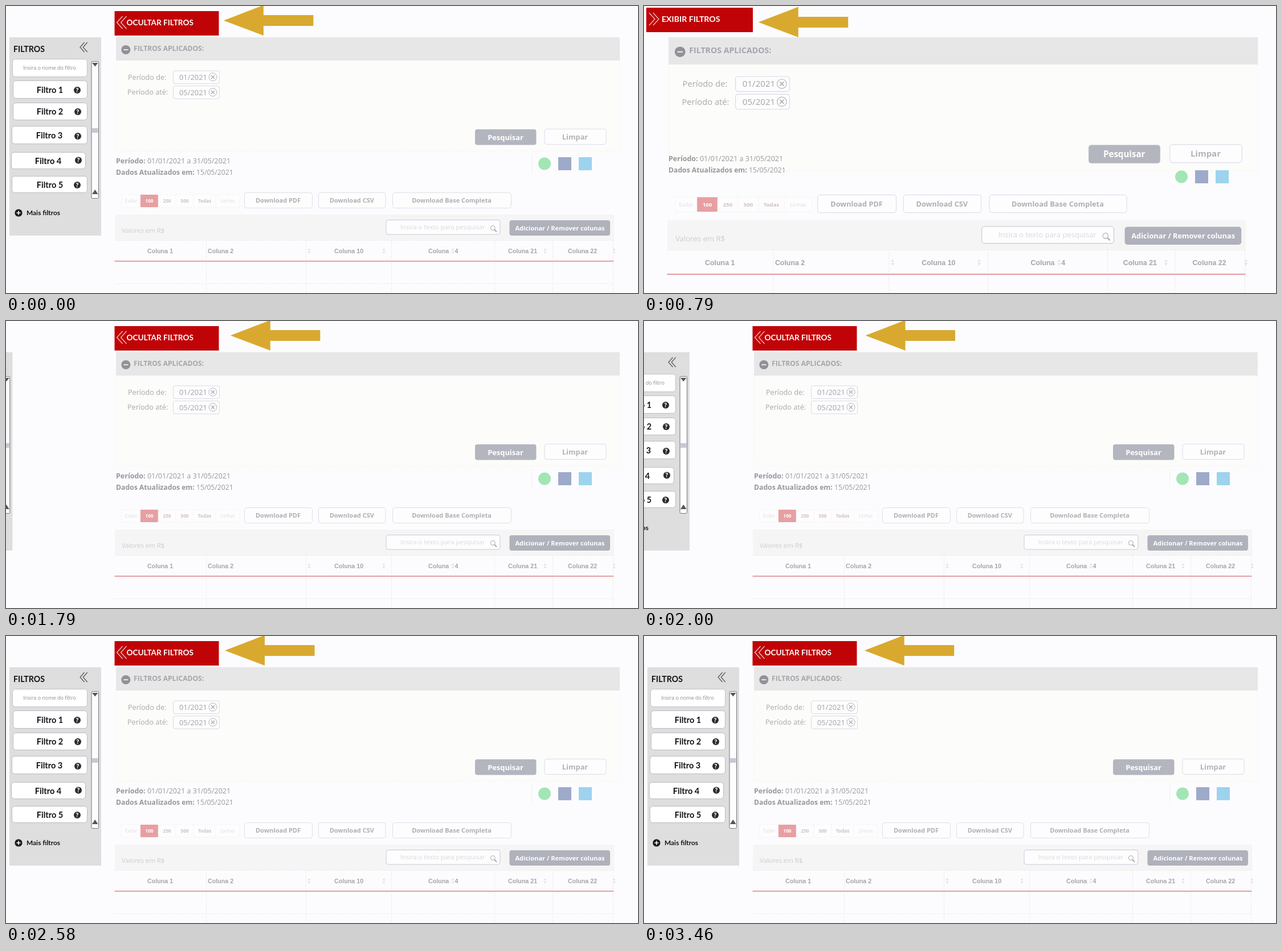
These frames come from a looping animation (1109 by 505 pixels, 3540 ms). An HTML page:

```html
<!DOCTYPE html>
<html lang="pt">
<head>
<meta charset="utf-8">
<style>
  html, body { margin: 0; width: 100%; height: 100%; overflow: hidden; background: #fcfcfe; }
  svg { display: block; width: 1109px; height: 505px; }
  text { font-family: "Open Sans", sans-serif; white-space: pre; }
  .lato { font-family: Lato, sans-serif; }
  .arial { font-family: "Liberation Sans", Arial, sans-serif; }
  .b { font-weight: 700; }
</style>
</head>
<body>
<svg id="stage" viewBox="0 0 1109 505"></svg>
<script>
const LOOP = 3540, HIDE_AT = 250, SHOW_AT = 1738;

const rect = (x, y, w, h, fill, stroke = 'none', r = 0, extra = '') =>
  `<rect x="${x}" y="${y}" width="${w}" height="${h}" rx="${r}" fill="${fill}" stroke="${stroke}" ${extra}/>`;
const line = (d, color, width = 1, extra = '') =>
  `<path d="${d}" fill="none" stroke="${color}" stroke-width="${width}" ${extra}/>`;
const shape = (d, fill) => `<path d="${d}" fill="${fill}"/>`;
const disc = (x, y, r, fill, stroke = 'none') =>
  `<circle cx="${x}" cy="${y}" r="${r}" fill="${fill}" stroke="${stroke}"/>`;
const text = (s, x, y, size, fill, cls = '', anchor = 'start') =>
  `<text x="${x}" y="${y}" font-size="${size}" fill="${fill}" class="${cls}" text-anchor="${anchor}">${s}</text>`;
const mid = (s, x, y, size, fill, cls = 'b') => text(s, x, y, size, fill, cls, 'middle');
const group = (id, body, transform = '') => `<g id="${id}" transform="${transform}">${body}</g>`;
const dashed = 'stroke-dasharray="2 2"';

// Two open angles starting at tip x; dir 1 points left, -1 points right.
function chevrons(x, y, w, h, color, dir) {
  const one = tip => `M${tip + dir * w} ${y}L${tip} ${y + h / 2}L${tip + dir * w} ${y + h}`;
  return line(one(x) + one(x + dir * w * 0.7), color, 1.2);
}

function button(label, x, y, w, textX, size, tip, dir) {
  return rect(x, y, w, 43, '#c00306') +
    chevrons(tip, y + 9, 10, 22, '#f3cccc', dir) +
    text(label, textX, y + 25, size, '#fff', 'lato b');
}

function periodRow(label, value, x, y) {
  return text(label, x, y + 4.5, 12.6, '#a9a8ae') +
    rect(293.5, y - 11, 81, 22.5, '#fdfdfe', '#d9d8e8', 3.5) +
    text(value, 304, y + 4.7, 12.9, '#a3a2a8') +
    disc(363, y, 7, 'none', '#b3b2b8') +
    line(`M360 ${y - 3}l6 6m0 -6l-6 6`, '#b0afb5', 1.5);
}

function panel() {
  return rect(193, 55, 884, 201, '#fcfcfa') +
    line('M193.5 96V255.5H1076.5V96', '#f3f3e8', 1, dashed) +
    rect(193, 55, 884, 41, '#e7e7e8') +
    disc(210.3, 77, 8, '#929198') + rect(206.3, 76, 8, 2, '#e7e7e8') +
    text('FILTROS APLICADOS:', 224, 79.3, 12.1, '#a6a5ab', 'b') +
    periodRow('Período de:', '01/2021', 214, 125) +
    periodRow('Período até:', '05/2021', 213, 151.8) +
    rect(823, 217, 107.5, 27.5, '#b4b6bf', 'none', 4) +
    mid('Pesquisar', 876.5, 235.5, 12.9, '#fff') +
    rect(945, 216.5, 108, 27, '#fdfdfe', '#dddcec', 4) +
    mid('Limpar', 998.5, 234.5, 12.8, '#b3b2b8');
}

function sortMark(x) {
  return shape(`M${x - 2.5} 430l2.5 -4l2.5 4zM${x - 2.5} 432l2.5 4l2.5 -4z`, '#e2e2ec');
}

function table() {
  const edges = [203, 236, 267, 298, 329, 368, 410];
  const cells = ['Exibir', '100', '250', '500', 'Todas', 'Linhas'].map((s, i) => {
    const x = edges[i], w = edges[i + 1] - x, on = i === 1, faint = i === 0 || i === 5;
    return rect(x, 332, w, 22, on ? '#e79fa2' : '#fdfdfe', on ? 'none' : '#f0f0f0', 0, dashed) +
      mid(s, x + w / 2, 346.3, 8.3, on ? '#fff' : faint ? '#dddce0' : '#d2c0c6', faint ? '' : 'b');
  }).join('');
  const downloads = [['PDF', 418.5, 119], ['CSV', 548.5, 117.5], ['Base Completa', 678.5, 208]]
    .map(([s, x, w]) => rect(x, 328.5, w, 27, '#fdfdfe', '#dfdee8', 4) +
      mid('Download ' + s, x + w / 2 - 0.5, 346, 11, '#b0b0b2')).join('');
  const columns = [['Coluna 1', 248], ['Coluna 2', 354], ['Coluna 10', 576], ['Coluna', 741],
    ['4', 787.5], ['Coluna 21', 881], ['Coluna 22', 986]]
    .map(([s, x]) => text(s, x, 435, 10.7, '#a6a6a8', 'arial b')).join('');
  const rules = [351, 526, 676, 857, 959, 1065].map(x => `M${x + 0.5} 412V505`).join('');
  return cells + downloads +
    rect(191, 367, 876, 45, '#f5f5f5') +
    text('Valores em R$', 203, 399.3, 11.4, '#cccbd0') +
    rect(667, 376.5, 200, 25.5, '#fdfdfe', '#c9c8da', 4) +
    text('Insira o texto para pesquisar', 692, 393, 11.2, '#d9d9dc') +
    disc(854.3, 390.5, 4, 'none', '#a9a9ac') + line('M857 393.5l4 4', '#a9a9ac', 2) +
    rect(883.5, 377, 176.5, 27, '#afb1bb', 'none', 4) +
    mid('Adicionar / Remover colunas', 972, 394.7, 11, '#fff') +
    line(rules + 'M191 412.5H1067M191 488.5H1066', '#e6e6e2', 1, dashed) +
    columns + [532, 663, 784, 946, 1067].map(sortMark).join('') +
    rect(190.5, 448, 876, 2, '#e5a0a5');
}

function summary() {
  const row = (label, value, y, size) =>
    text(`<tspan class="b">${label}</tspan> ${value}`, 193, y, size, '#98979d');
  return row('Período:', '01/01/2021 a 31/05/2021', 277, 12.5) +
    row('Dados Atualizados em:', '15/05/2021', 297, 12.2);
}

const badges = disc(945, 277.5, 11, '#a2e6b5') +
  rect(969, 266, 23, 23, '#9eaaca') + rect(1005, 266, 23, 23, '#9dd3ee');

function sidebar() {
  const filters = [[12, 131, 131, 32, 77, 125, 148], [12, 170, 131, 31, 77, 126, 186],
    [10, 211, 133, 32, 76, 126, 229], [9, 257, 131, 30, 74, 127, 271.5], [10, 299, 133, 30, 77, 125, 315]]
    .map(([x, y, w, h, textX, iconX, iconY], i) =>
      rect(x + 0.5, y + 0.5, w - 1, h - 1, '#fff', '#bcbbc4', 5) +
      mid('Filtro ' + (i + 1), textX, y + h / 2 + 5.5, 14.5, '#111', 'lato b') +
      disc(iconX, iconY, 6, '#2b2b2e') + mid('?', iconX, iconY + 3.6, 10, '#fff')).join('');
  return rect(6, 55, 161, 349, '#dedede') +
    text('FILTROS', 13, 81, 14.2, '#151515', 'lato b') +
    chevrons(130, 64, 7.5, 17, '#56565c', 1) +
    rect(11.5, 93.5, 131, 31, '#fff', '#c3c2cc', 5) +
    mid('Insira o nome do filtro', 76.5, 112, 9, '#8b8b90', '') +
    filters +
    rect(150, 97.5, 12.5, 241, '#fdfdfe', '#77777c', 2) +
    shape('M151 100h10.5l-5.25 6.5zM151 331h10.5l-5.25 -8z', '#55555a') +
    rect(151, 215, 10.5, 8, '#c8c8d4') +
    disc(22, 364, 6.6, '#1c1c1e') + line('M18.5 364h7M22 360.5v7', '#fff', 1.6) +
    text('Mais filtros', 36, 368, 11.9, '#151515', 'lato b');
}

const open = panel() + table() + summary() + badges +
  line('M922.5 262V295', '#e4e4e0', 1, dashed) +
  button('OCULTAR FILTROS', 190.5, 9, 183, 211.5, 13.6, 194.5, 1);
const closed =
  group('widePanel', panel(), 'translate(43 55) scale(1.17) translate(-193 -55)') +
  group('wideTable', table(), 'translate(41 377) scale(1.159) translate(-191 -367)') +
  group('wideSummary', summary(), 'translate(-150 -4)') +
  group('wideBadges', badges, 'translate(-2 23)') +
  button('EXIBIR FILTROS', 4, 3, 187, 31, 14.1, 26, -1);

const stage = document.getElementById('stage');
stage.innerHTML = group('open', open) + group('closed', closed) + group('sidebar', sidebar()) +
  group('arrow', shape('M0 0L70 -27V-9.5H157.5V9.5H70V26.5Z', '#d9a92f'));
const part = id => document.getElementById(id);
const ramp = (t, start) => Math.min(1, Math.max(0, (t - start) / 529));

function draw(now) {
  const t = now % LOOP;
  const isClosed = t >= HIDE_AT && t < SHOW_AT;
  part('open').style.display = isClosed ? 'none' : '';
  part('closed').style.display = isClosed ? '' : 'none';

  const away = ramp(t, 267) - ramp(t, SHOW_AT);
  part('sidebar').setAttribute('transform', `translate(${-173 * away} 0)`);

  // The arrow sways, restarting each time the layout switches.
  const clock = t < HIDE_AT ? Math.max(t, 130) + LOOP : t;
  const sway = 6.8 * Math.cos((clock - (isClosed ? 180 : 1670)) / 1400 * 2 * Math.PI);
  part('arrow').setAttribute('transform',
    `translate(${(isClosed ? 207 : 388) + sway} ${isClosed ? 28.5 : 25.5})`);
}

const begin = performance.now();
function tick() {
  draw(performance.now() - begin);
  requestAnimationFrame(tick);
}
tick();
</script>
</body>
</html>
```
